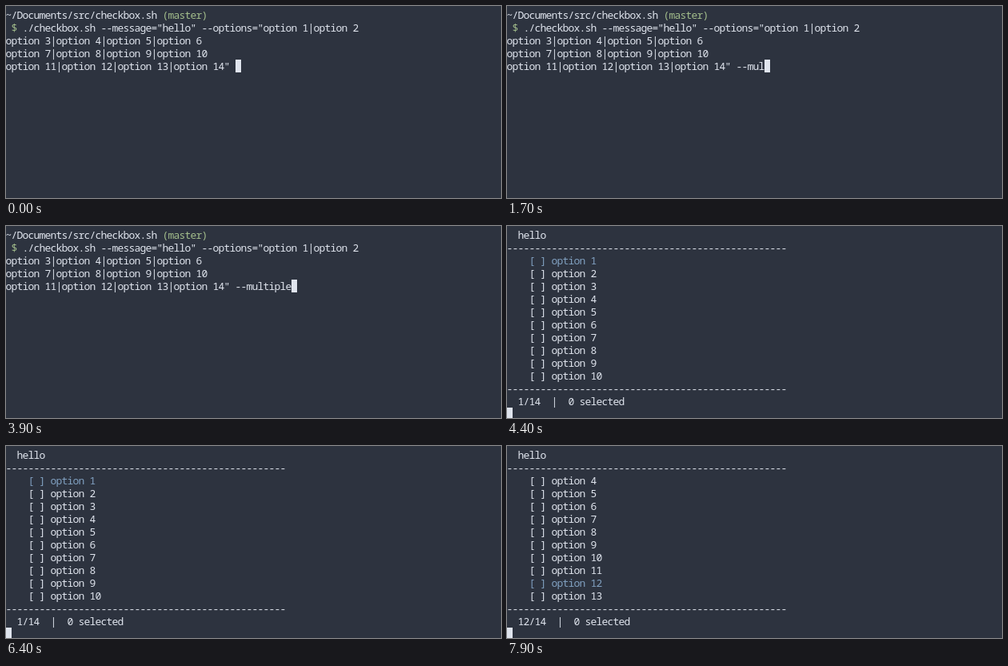
Recreate the animation shown at these times as an HTML page with a canvas. Size 619 px wide and 240 px high, loop 8000 ms.

```html
<!DOCTYPE html>
<html lang="en">
<head>
<meta charset="utf-8">
<title>Checkbox in a terminal</title>
<style>
  html, body { margin: 0; height: 100%; overflow: hidden; background: #2d333f; }
  canvas { display: block; }
</style>
</head>
<body>
<canvas width="619" height="240"></canvas>
<script>
const ctx = document.querySelector('canvas').getContext('2d');
const LOOP = 8000, CELL = 7, LINE = 16, TOP = 3, BASELINE = 13;
const OPTIONS = 14, PAGE = 10;
const BACK = '#2d333f', TEXT = '#e0e5ee', GREEN = '#a3be8c', BLUE = '#81a1c1';

// Each step: [start time, value]
const typed = [
  [0, ''], [400, '-'], [600, '--'], [1000, '--m'], [1100, '--mu'],
  [1700, '--mul'], [1800, '--mult'], [2000, '--multp'], [2200, '--multpl'],
  [2800, '--multp'], [2900, '--mult'], [3500, '--multi'],
  [3700, '--multip'], [3800, '--multipl'], [3900, '--multiple'],
];
const current = [
  [0, 1], [6700, 2], [7200, 3], [7300, 5], [7400, 8], [7500, 9],
  [7700, 10], [7800, 11], [7900, 12],
];
const ENTER = 4300, MENU = 4400, SELECT_ALL = 5700, UNSELECT_ALL = 6400;

const valueAt = (steps, t) => steps.findLast(([start]) => start <= t)[1];

function print(col, row, text, color = TEXT) {
  ctx.fillStyle = color;
  [...text].forEach((char, i) =>
    ctx.fillText(char, (col + i + 0.5) * CELL, TOP + row * LINE + BASELINE));
}

function cursor(col, row) {
  ctx.fillStyle = TEXT;
  ctx.fillRect(col * CELL, TOP + row * LINE, CELL, LINE);
}

function drawPrompt(t) {
  print(0, 0, '~/Documents/src/checkbox.sh');
  print(28, 0, '(master)', GREEN);
  print(1, 1, '$', GREEN);
  print(3, 1, './checkbox.sh --message="hello" --options="option 1|option 2');
  print(0, 2, 'option 3|option 4|option 5|option 6');
  print(0, 3, 'option 7|option 8|option 9|option 10');
  const lastLine = 'option 11|option 12|option 13|option 14" ' + valueAt(typed, t);
  print(0, 4, lastLine);
  if (t < ENTER) cursor(lastLine.length, 4);
  else cursor(0, 5);
}

function drawMenu(t) {
  const active = valueAt(current, t);
  const first = Math.max(1, active - PAGE + 2);
  const allSelected = t >= SELECT_ALL && t < UNSELECT_ALL;
  const rule = '-'.repeat(50);

  print(2, 0, 'hello');
  print(0, 1, rule);
  for (let i = 0; i < PAGE; i++) {
    const option = first + i;
    print(4, 2 + i, `[${allSelected ? 'x' : ' '}] option ${option}`,
      option === active ? BLUE : TEXT);
  }
  print(0, 12, rule);
  print(2, 13, `${active}/${OPTIONS}  |  ${allSelected ? OPTIONS : 0} selected`);
  cursor(0, 14);
}

function frame() {
  const t = performance.now() % LOOP;
  ctx.fillStyle = BACK;
  ctx.fillRect(0, 0, 619, 240);
  ctx.font = '13px "Noto Sans Mono", monospace';
  ctx.textAlign = 'center';
  if (t < MENU) drawPrompt(t);
  else drawMenu(t);
  requestAnimationFrame(frame);
}
frame();
</script>
</body>
</html>
```
